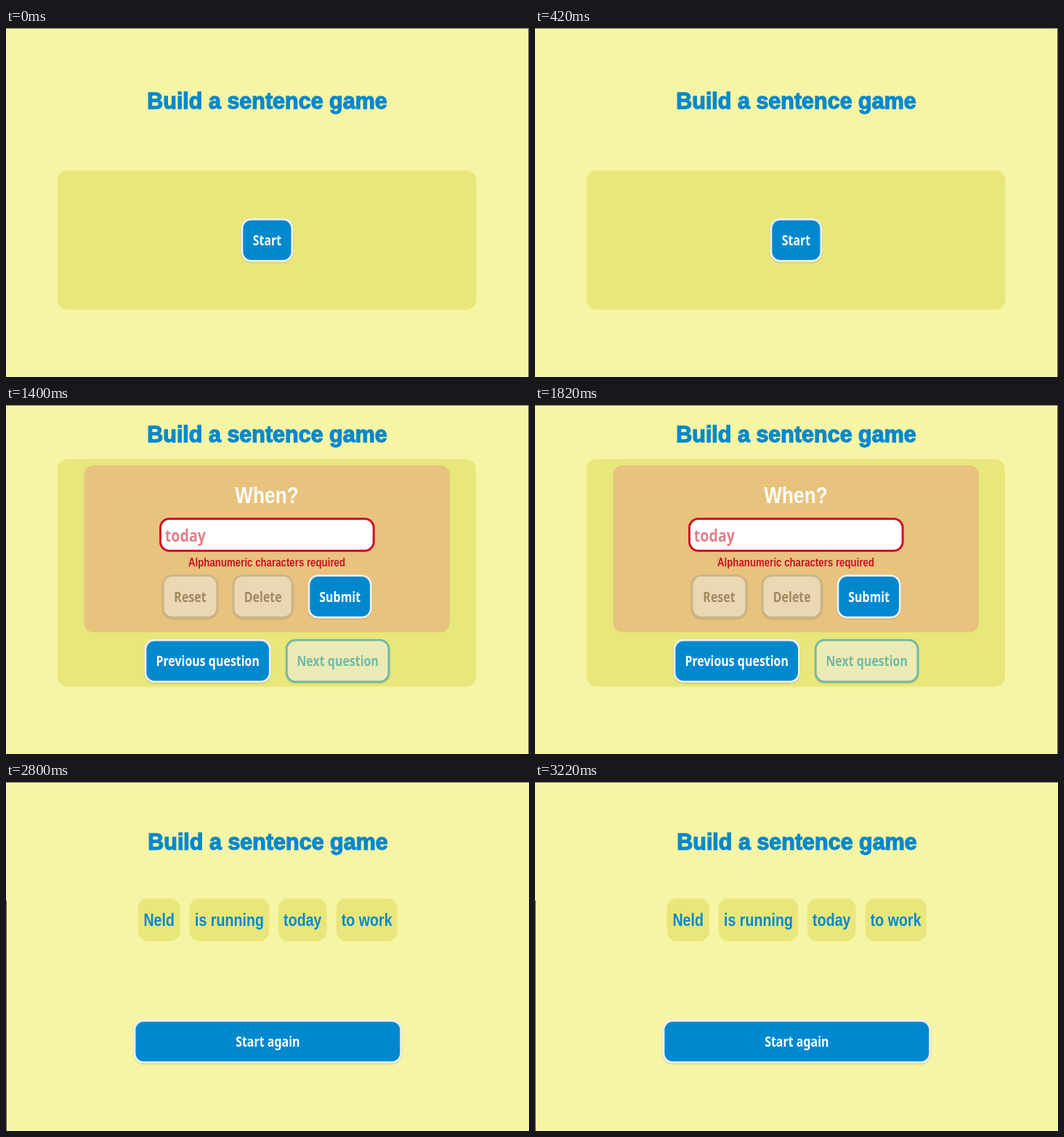
An HTML page with a canvas for the animation above (3.5 s loop, 720x480 px).

```html
<!DOCTYPE html>
<html lang="en">
<head>
<meta charset="utf-8">
<title>Build a sentence game</title>
<style>
  html, body { margin: 0; width: 100%; height: 100%; overflow: hidden; background: #f6f4a5; }
  canvas { display: block; }
</style>
</head>
<body>
<canvas id="stage" width="720" height="480"></canvas>
<script>
const ctx = document.getElementById('stage').getContext('2d');
const SCENE_MS = 700;
const SQUEEZE = 0.84; // the whole page is set in narrowed type
const SANS = '"Liberation Sans", Arial, sans-serif';
const UI = '"Noto Sans", sans-serif';
const BLUE = '#0088cf', RED = '#cc1226', PANEL = '#e8e77b', PALE = '#eeeeee';
const HERO = 'Neld';

// Button looks: fill, border, text
const LOOK = {
  primary: [BLUE, PALE, '#ffffff'],
  plain: [PALE, '#aaaaaa', '#555555'],
  off: ['#ebd8b2', '#cab68c', '#9f8963'],
  danger: [RED, RED, PALE],
  next: [PALE, BLUE, BLUE],
  nextOff: ['#ebebb5', '#74b8a4', '#74b8a4'],
  nextFaded: ['#77b8a5', '#e9e9b2', '#f3f2b5']
};

function box(x0, y0, x1, y1, r, fill) {
  ctx.fillStyle = fill;
  ctx.beginPath();
  ctx.roundRect(x0, y0, x1 - x0, y1 - y0, r);
  ctx.fill();
}

function framed(x0, y0, x1, y1, r, fill, border, w = 3) {
  box(x0, y0, x1, y1, r, border);
  box(x0 + w, y0 + w, x1 - w, y1 - w, r - w, fill);
}

function label(str, x, y, size, family, color, align = 'center') {
  ctx.save();
  ctx.translate(x, y);
  ctx.scale(SQUEEZE, 1);
  ctx.font = `bold ${size}px ${family}`;
  ctx.textAlign = align;
  ctx.fillStyle = color;
  ctx.fillText(str, 0, 0);
  ctx.restore();
}

function title(x, y) {
  const str = 'Build a sentence game';
  ctx.font = `bold 30.5px ${SANS}`;
  ctx.textAlign = 'center';
  ctx.fillStyle = ctx.strokeStyle = BLUE;
  ctx.lineWidth = 1.3;
  ctx.lineJoin = 'miter';
  ctx.fillText(str, x, y);
  ctx.strokeText(str, x, y);
}

function button(str, x0, y0, x1, y1, look) {
  const [fill, border, color] = LOOK[look];
  ctx.save();
  ctx.shadowColor = 'rgba(0,0,0,0.18)';
  ctx.shadowBlur = 2;
  ctx.shadowOffsetY = 1;
  box(x0, y0, x1, y1, 14, border);
  ctx.restore();
  framed(x0, y0, x1, y1, 14, fill, border, 2.7);
  label(str, (x0 + x1) / 2, (y0 + y1) / 2 + 7.2, 19, UI, color);
}

function tick(x, y) {
  ctx.fillStyle = '#078a07';
  ctx.beginPath();
  ctx.moveTo(x - 5, y + 1);
  ctx.lineTo(x - 3, y);
  ctx.lineTo(x - 1.2, y + 3.4);
  ctx.lineTo(x + 3.6, y - 6);
  ctx.lineTo(x + 5.4, y - 6);
  ctx.lineTo(x - 0.4, y + 6.5);
  ctx.lineTo(x - 2, y + 6.5);
  ctx.fill();
}

function edge(x, y0 = 0) {
  ctx.fillStyle = '#5c5b48';
  ctx.fillRect(x, y0, 1, 480 - y0);
}

function question(dx, dy, q) {
  title(360.5 + dx, 50 + dy);
  ctx.save();
  ctx.translate(dx, 0);
  box(72, 73 + dy * 1.5, 648, 387.5, 14, PANEL);
  box(108.5, 81 + dy * 2, 612, 313 - dy * 0.5, 13, '#e8c37d');
  label(q.ask, 360, 133 + dy * 2, 31.2, SANS, '#ffffff');
  framed(212, 153 + dy * 2, 508.7, 200 + dy * 2, 14, '#ffffff', q.border);
  label(q.answer, 219.8, 186 + dy * 2, 23.4, UI, q.ink, 'left');
  if (q.error) label(q.error, 360, 222, 15.8, SANS, RED);
  else tick(360.3, 216);
  const top = 234 - dy * 0.6;
  button('Reset', 216, top, 293, top + 60, q.reset);
  button('Delete', 313, top, 396.5, top + 60, q.remove);
  button('Submit', 416.7, top, 504.7, top + 60, 'primary');
  const low = 322.7 - dy * 0.7;
  if (q.first) {
    button('Next question', 288.8, low, 431.8, low + 60, q.next);
  } else {
    button('Previous question', 191.7, low, 365.7, low + 60, 'primary');
    button('Next question', 386, low, 529.3, low + 60, q.next);
  }
  ctx.restore();
}

const scenes = [
  () => {
    edge(719);
    title(359.5, 111);
    box(71, 195.7, 647.3, 387.5, 14, PANEL);
    button('Start', 323.7, 261.8, 395.2, 321.8, 'primary');
  },
  () => {
    edge(0);
    question(0, 0, {
      ask: 'What?', answer: 'is running', border: '#cccccc', ink: BLUE,
      reset: 'off', remove: 'plain', next: 'next'
    });
  },
  () => {
    edge(719);
    question(-1, 1, {
      ask: 'When?', answer: 'today', border: RED, ink: '#e27f8b',
      error: 'Alphanumeric characters required',
      reset: 'off', remove: 'off', next: 'nextOff'
    });
    ctx.fillStyle = '#c9a878';
    ctx.fillRect(251, 208, 1, 15);
  },
  () => {
    edge(719);
    question(-0.6, 0, {
      ask: 'Who?', answer: HERO, border: BLUE, ink: BLUE, first: true,
      reset: 'plain', remove: 'danger', next: 'nextFaded'
    });
    ctx.fillStyle = '#b5d9ef';
    ctx.fillRect(266, 163, 1, 28);
  },
  () => {
    edge(0, 163);
    title(360.5, 93);
    const chips = [[HERO, 181.7, 239.7], ['is running', 252.6, 362.2],
                   ['today', 375, 441.6], ['to work', 454.7, 538.8]];
    for (const [word, x0, x1] of chips) {
      box(x0, 160, x1, 219, 14, PANEL);
      label(word, (x0 + x1) / 2, 198, 23.4, SANS, BLUE);
    }
    button('Start again', 175.7, 327, 545, 387, 'primary');
  }
];

function draw(now) {
  ctx.fillStyle = '#f6f4a5';
  ctx.fillRect(0, 0, 720, 480);
  scenes[Math.floor(now / SCENE_MS) % scenes.length]();
  ctx.fillStyle = '#7c7b5c';
  ctx.fillRect(0, 0, 720, 1);
}

const start = performance.now();
function tickFrame() {
  draw(performance.now() - start);
  requestAnimationFrame(tickFrame);
}
tickFrame();
</script>
</body>
</html>
```
